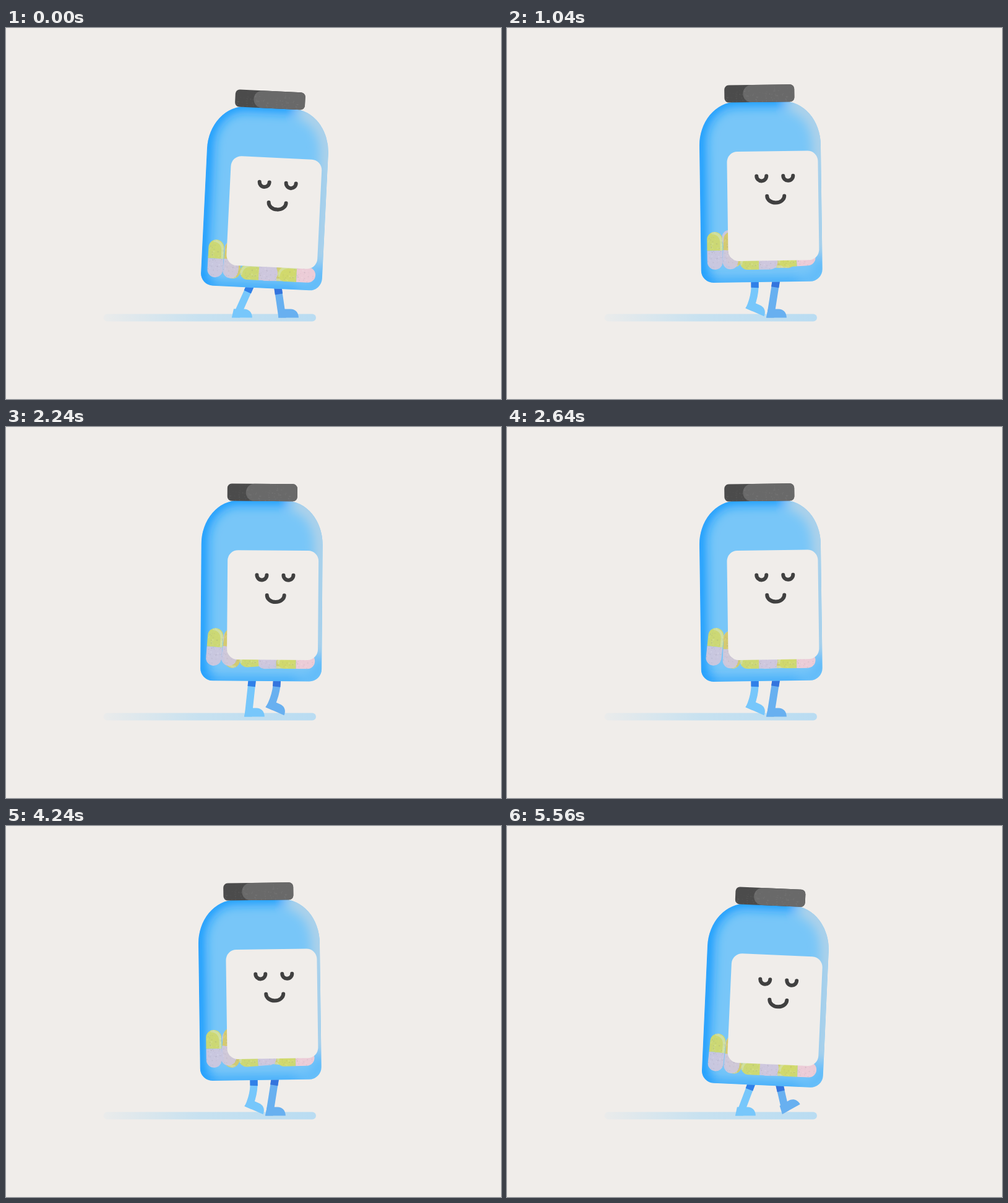
An HTML page for the animation above (5.6 s loop, 800x600 px).

```html
<!DOCTYPE html>
<html lang="en">
<head>
<meta charset="utf-8">
<title>Walking pill bottle</title>
<style>
  html, body { margin: 0; width: 100%; height: 100%; overflow: hidden; background: #f0edea; }
  svg { display: block; width: 100vw; height: 100vh; }
  .leg { fill: none; stroke-width: 12; }
  .cuff { fill: none; stroke-width: 12.4; stroke-dasharray: 23 200; }
  .face { fill: none; stroke: #404040; stroke-width: 6; stroke-linecap: round; }
</style>
</head>
<body>
<svg viewBox="0 0 800 600">
  <defs>
    <linearGradient id="trail">
      <stop offset="0" stop-color="#c0dff1" stop-opacity=".12"/>
      <stop offset=".45" stop-color="#c0dff1" stop-opacity=".85"/>
      <stop offset="1" stop-color="#b9dcf2"/>
    </linearGradient>
    <path id="shell" d="M-98-221A60 71 0 0 1-38-292H38A60 71 0 0 1 98-221V-20A20 20 0 0 1 78 0H-78A20 20 0 0 1-98-20Z"/>
    <clipPath id="inside"><use href="#shell"/></clipPath>
    <clipPath id="capsule"><rect x="-12.5" y="-30.5" width="25" height="61" rx="12.5"/></clipPath>
    <filter id="soft" filterUnits="userSpaceOnUse" x="-160" y="-350" width="320" height="410">
      <feGaussianBlur stdDeviation="9"/>
    </filter>
    <pattern id="grain" width="48" height="48" patternUnits="userSpaceOnUse"></pattern>
  </defs>

  <rect x="157.500" y="462.500" width="343.500" height="12" rx="6" fill="url(#trail)"/>
  <g id="legs"></g>

  <g id="bottle">
    <use href="#shell" fill="#78c6f8"/>
    <g clip-path="url(#inside)" fill="none">
      <g filter="url(#soft)">
        <path d="M40-296H-38A60 71 0 0 0-99-221V-20A20 20 0 0 0-78 1" stroke="#149afe" stroke-width="22"/>
        <path d="M-85 2H60" stroke="#2ba3fc" stroke-width="13"/>
        <path d="M60 2Q98 0 99-40" stroke="#4db2fb" stroke-width="10"/>
        <path d="M48-288A54 68 0 0 1 97-221V-45" stroke="#b4d3e8" stroke-width="23"/>
      </g>
    </g>
    <g id="pills"></g>
    <g id="label">
      <rect x="-73.500" y="-211.500" width="147" height="177" rx="17" fill="#f0edea"/>
      <g class="face">
        <path d="M-26-171.500a8 8 0 0 0 16 0"/>
        <path d="M17-171.500a8 8 0 0 0 16 0"/>
        <path d="M-9.500-139a14 11 0 0 0 28 0"/>
      </g>
    </g>
    <g>
      <rect x="-56.500" y="-319" width="113" height="28" rx="7" fill="#4b4b4b"/>
      <path d="M-12.500-319H49.500a7 7 0 0 1 7 7v14a7 7 0 0 1-7 7H-12.500a14 14 0 0 1 0-28Z" fill="#696969"/>
      <rect x="-56.500" y="-319" width="113" height="28" rx="7" fill="url(#grain)" opacity=".35"/>
    </g>
  </g>
</svg>

<script>
const LOOP = 5600, STRIDE = 800, STEP = 400, TAU = Math.PI * 2;
const CENTER = 412, GROUND = 468.5;
const $ = id => document.getElementById(id);
const wave = (t, period, peak) => Math.cos(TAU * (t - peak) / period);
const turn = (x, y, deg) => {
  const a = deg * Math.PI / 180, c = Math.cos(a), s = Math.sin(a);
  return [x * c - y * s, x * s + y * c];
};

function add(parent, tag, attrs) {
  const el = document.createElementNS('http://www.w3.org/2000/svg', tag);
  for (const k in attrs) el.setAttribute(k, attrs[k]);
  return parent.appendChild(el);
}

// Fine speckle for pills and cap
let seed = 7;
const rnd = () => (seed = seed * 16807 % 2147483647) / 2147483647;
for (let i = 0; i < 130; i++) {
  add($('grain'), 'circle', {
    cx: rnd() * 48, cy: rnd() * 48, r: 0.4 + rnd() * 0.4,
    fill: i % 2 ? '#fff' : '#776f80', opacity: 0.28
  });
}

// Heel path of one stride: phase, x, height, foot angle, knee bend
const GAIT = [
  [0, 440, 0, 0, 0], [240, 419, 0, 0, 0], [360, 403, 0, 0, 0], [400, 399, 0, 0, 0],
  [440, 396, 7, 14, 3], [480, 394.5, 15, 30, 8], [520, 396, 20, 39, 13], [560, 401, 21.5, 40, 15],
  [640, 419, 15.5, 24, 10], [720, 439, 6, -10, 3], [760, 445, 2.5, -30, 0], [800, 440, 0, 0, 0]
];

function gait(phase) {
  const i = GAIT.findIndex(k => k[0] > phase);
  const a = GAIT[i - 1], b = GAIT[i], f = (phase - a[0]) / (b[0] - a[0]);
  return a.map((v, j) => v + (b[j] - v) * f);
}

function makeLeg(id, color, cuffColor, hipX, shiftX, delay) {
  const clip = add(document.querySelector('defs'), 'clipPath', { id });
  const cut = add(clip, 'rect', { x: -100, y: -140, width: 200, height: 140 });
  const g = add($('legs'), 'g', { 'clip-path': `url(#${id})` });
  const leg = add(g, 'path', { class: 'leg', stroke: color });
  const cuff = add(g, 'path', { class: 'cuff', stroke: cuffColor });
  const foot = add($('legs'), 'path', {
    d: 'M0 0L3-14H19C27-14.500 33-9 33 0Z', fill: color
  });
  return (t, baseY, tilt) => {
    const [, gx, lift, angle, bend] = gait((t + delay) % STRIDE);
    const heel = [gx + shiftX, GROUND - lift];
    const [hx, hy] = turn(hipX, -14, tilt);
    const hip = [CENTER + hx, baseY + hy];
    const [ax, ay] = turn(6.6, 0, angle);
    const end = [heel[0] + ax, heel[1] + ay];
    const knee = [(hip[0] + end[0]) / 2 + bend, (hip[1] + end[1]) / 2];
    const dx = end[0] - knee[0], dy = end[1] - knee[1], len = Math.hypot(dx, dy);
    const d = `M${hip}Q${knee} ${end}l${dx / len * 8} ${dy / len * 8}`;
    const place = `translate(${heel}) rotate(${angle})`;
    leg.setAttribute('d', d);
    cuff.setAttribute('d', d);
    cut.setAttribute('transform', place);
    foot.setAttribute('transform', place);
  };
}

const legs = [
  makeLeg('cutFar', '#68b0f0', '#3474dd', 25, 0, 0),
  makeLeg('cutNear', '#77c7fb', '#3080e8', -13, -34, STEP)
];

// x, y, angle, first half, second half, time of highest hop, extra tilt
const YELLOW = '#d2da6c', LILAC = '#cfc8de', GOLD = '#d6cb6b', PINK = '#f4cdd5';
const pills = [
  [-48, -43, 176, GOLD, LILAC, 700, -9],
  [24, -24.5, 88, GOLD, LILAC, 1500, 8],
  [-49.5, -43.4, 3, GOLD, LILAC, 1840, 7],
  [-4.5, -24.4, -90, YELLOW, LILAC, 1900, -7],
  [56.5, -24.4, -90, YELLOW, PINK, 900, -3],
  [-75.3, -43.4, 0, YELLOW, LILAC, 2640, 7]
].map(([x, y, angle, top, bottom, peak, sway]) => {
  const g = add($('pills'), 'g', { opacity: 0.94 });
  const body = add(g, 'g', { 'clip-path': 'url(#capsule)' });
  const half = (y, fill) => add(body, 'rect', { x: -13, y, width: 26, height: 31, fill });
  half(-31, top);
  half(0, bottom);
  add(body, 'path', {
    d: 'M-5-29Q10.500-28 10.500-12V0', fill: 'none',
    stroke: '#d9e8c4', 'stroke-width': 4, opacity: 0.55
  });
  add(body, 'rect', { x: -13, y: -31, width: 26, height: 62, fill: 'url(#grain)' });
  return (t, hop) => {
    const extra = hop * Math.max(0, wave(t, LOOP / 2, peak));
    g.setAttribute('transform',
      `translate(${x} ${y - hop * 8.6 - extra * 5}) rotate(${angle + extra * sway})`);
  };
});

function draw(t) {
  const baseY = 415.3 + 5.2 * wave(t, STEP, 5);
  const tilt = -0.18 + 3 * wave(t, STRIDE, 15);
  const hop = Math.pow(Math.abs(Math.sin(Math.PI * t / STEP)), 0.6);
  $('bottle').setAttribute('transform', `translate(${CENTER} ${baseY}) rotate(${tilt})`);
  $('label').setAttribute('transform', `translate(${18.7 - 1.2 * tilt} 0)`);
  legs.forEach(move => move(t, baseY, tilt));
  pills.forEach(move => move(t, hop));
}

const start = performance.now();
function tick() {
  draw((performance.now() - start) % LOOP);
  requestAnimationFrame(tick);
}
tick();
</script>
</body>
</html>
```
